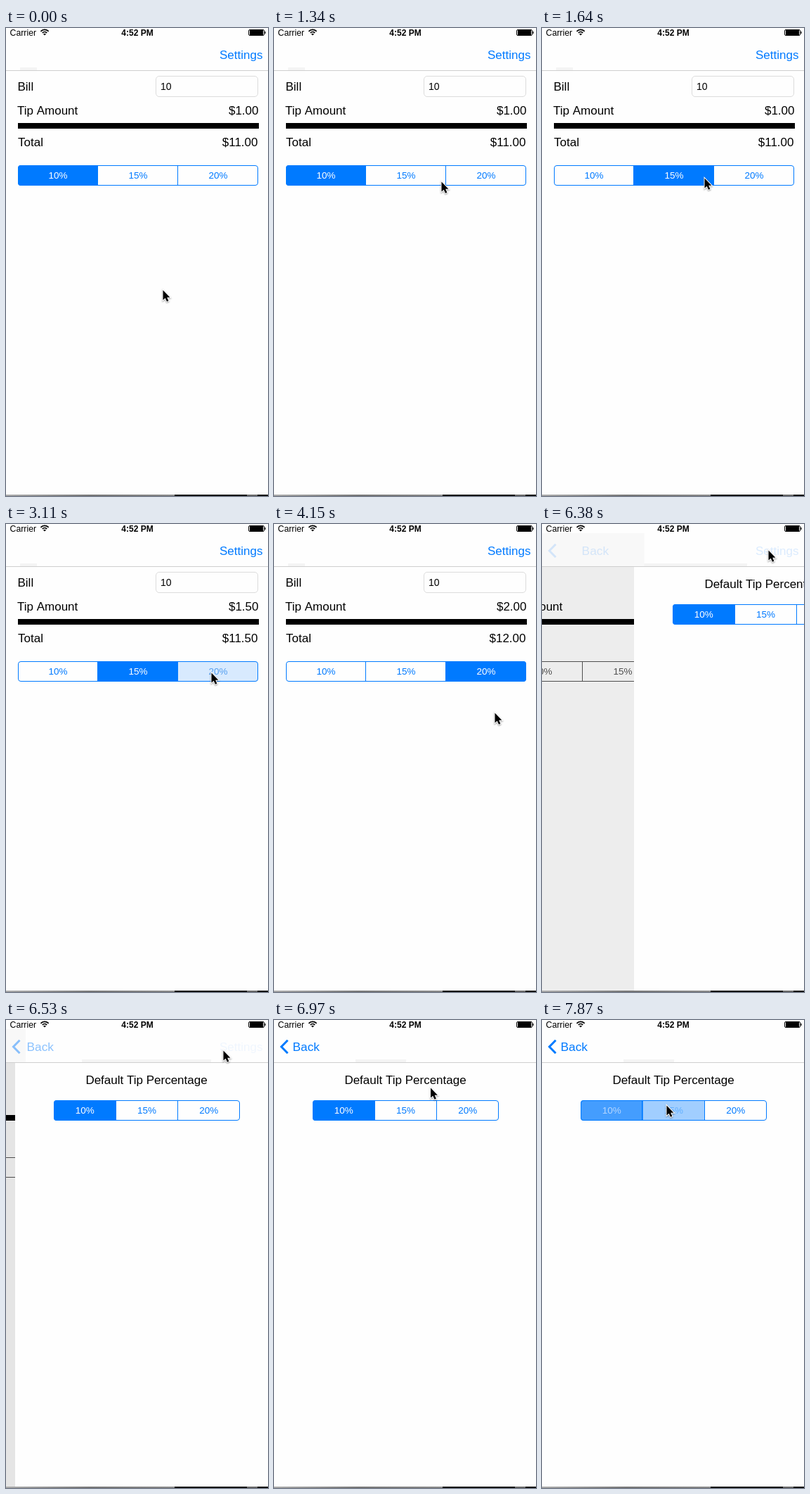
An HTML page with a canvas for the animation above (8 s loop, 373 by 665 pixels).

```html
<!DOCTYPE html>
<html lang="en">
<head>
<meta charset="utf-8">
<title>Tip calculator</title>
<style>
html, body { margin: 0; width: 100%; height: 100%; overflow: hidden; background: #fefefe; }
canvas { display: block; width: 373px; height: 665px; }
</style>
</head>
<body>
<canvas id="stage"></canvas>
<script>
const W = 373, H = 665, LOOP = 8000, STEP = 148.2;
const BLUE = '#007aff', PAPER = '#fefefe', FONT = '"Liberation Sans", Arial, sans-serif';
const canvas = document.getElementById('stage');
const ratio = window.devicePixelRatio || 1;
canvas.width = W * ratio;
canvas.height = H * ratio;
const ctx = canvas.getContext('2d');
ctx.scale(ratio, ratio);

// Pointer path: [step, x, y]
const PATH = [
  [0, 223, 372], [1, 225, 350], [3, 236, 262], [5, 238, 218],
  [9, 238, 218], [10, 231, 213], [12, 231, 213], [14, 252, 286], [16, 265, 268],
  [18, 280, 232], [20, 292, 211], [22, 292, 211], [24, 314, 268],
  [28, 314, 268], [30, 299, 215], [32, 294, 125], [34, 322, 45], [35, 328, 33],
  [42, 328, 33], [43, 322, 37], [44, 309, 43], [46, 255, 78], [48, 190, 114],
  [49, 176, 121], [50, 177, 121]
];

function pointerAt(step) {
  const i = PATH.findIndex(p => p[0] > step);
  if (i < 0) return PATH[PATH.length - 1].slice(1);
  const [a, ax, ay] = PATH[i - 1], [b, bx, by] = PATH[i];
  const u = (step - a) / (b - a);
  return [ax + (bx - ax) * u, ay + (by - ay) * u];
}

function rect(x, y, w, h, color) {
  ctx.fillStyle = color;
  ctx.fillRect(x, y, w, h);
}

function text(str, x, y, size = 17, color = '#000', align = 'left', weight = '') {
  ctx.font = `${weight} ${size}px ${FONT}`;
  ctx.textAlign = align;
  ctx.fillStyle = color;
  ctx.fillText(str, x, y);
}

function roundPath(x, y, w, h, r) {
  ctx.beginPath();
  ctx.roundRect(x, y, w, h, r);
}

function faded(alpha, draw) {
  ctx.save();
  ctx.globalAlpha = alpha;
  draw();
  ctx.restore();
}

function segments(x, y, w, fills, inks, tint = BLUE) {
  const h = 29, part = w / 3;
  ctx.save();
  roundPath(x, y, w, h, 4);
  ctx.clip();
  fills.forEach((alpha, i) => faded(alpha, () => rect(Math.round(x + part * i), y, Math.ceil(part), h, tint)));
  ctx.restore();
  roundPath(x + 0.5, y + 0.5, w - 1, h - 1, 3.5);
  ctx.strokeStyle = tint;
  ctx.lineWidth = 1;
  ctx.stroke();
  [1, 2].forEach(i => rect(Math.floor(x + part * i - 0.5), y, 1, h, tint));
  ['10%', '15%', '20%'].forEach((label, i) => {
    const ink = inks[i] || (fills[i] === 1 ? '#fff' : tint);
    text(label, x + part * (i + 0.5), y + 19, 13.5, ink, 'center');
  });
}

function statusBar() {
  text('Carrier', 5.5, 11, 12.3);
  text('4:52 PM', 187, 11, 12, '#000', 'center', 'bold');
  ctx.strokeStyle = '#000';
  ctx.lineWidth = 1.7;
  [4.4, 7.6].forEach(r => {
    ctx.beginPath();
    ctx.arc(55, 10, r, -Math.PI * 0.76, -Math.PI * 0.24);
    ctx.stroke();
  });
  ctx.beginPath();
  ctx.moveTo(55, 10.5);
  ctx.arc(55, 10.5, 2.7, -Math.PI * 0.76, -Math.PI * 0.24);
  ctx.fillStyle = '#000';
  ctx.fill();
  roundPath(345.5, 2.5, 22, 8, 1.5);
  ctx.lineWidth = 1;
  ctx.stroke();
  rect(347, 3, 19, 7, '#000');
  rect(368.5, 5, 1.2, 3, '#000');
}

function tipFills(step) {
  if (step < 10) return [1, 0, 0];
  if (step < 11) return [1, 0.15, 0];
  if (step < 21) return [0, 1, 0];
  if (step < 22) return [0, 1, 0.15];
  return [0, 0, 1];
}

function tipView(step, tint) {
  const rate = step < 16 ? 10 : step < 28 ? 15 : 20;
  const tip = 10 * rate / 100;
  text('Bill', 16.5, 89);
  roundPath(213.5, 68.5, 145, 29, 4.5);
  ctx.strokeStyle = '#dcdcdc';
  ctx.lineWidth = 1;
  ctx.stroke();
  text('10', 220, 88, 14);
  text('Tip Amount', 16, 123);
  text('$' + tip.toFixed(2), 359.5, 123, 17, '#000', 'right');
  rect(17, 135, 343, 8, '#000');
  text('Total', 17, 168);
  text('$' + (10 + tip).toFixed(2), 358.5, 168, 17, '#000', 'right');
  segments(17, 195, 342, tipFills(step), step === 21 ? [, , '#559ff0'] : [], tint);
}

function settingsView(step) {
  const blend = step >= 53;
  text('Default Tip Percentage', 187, 91, 17, '#000', 'center');
  segments(55, 114, 265, blend ? [0.73, 0.37, 0] : [1, 0, 0], blend ? ['#b4d6ff', '#62b0ff'] : []);
}

function navBar(step, rest) {
  if (step < 43) rect(20, 56, 24, 4, '#f4f4f4');
  else if (step < 46) rect(108, 56, 184, 4, '#f4f4f4');
  else rect(116, 56, 72, 4, '#f4f4f4');
  if (step > 42 && rest > 0) rect(0, 13, rest * W + 15, 47, '#f8f8f8');
  rect(0, 60, W, 1, '#cfcfcf');

  const settings = step < 42 ? 1 : [0.2, 0.14, 0.06, 0.02][step - 42] || 0;
  faded(settings, () => text('Settings', 304, 44, 17, BLUE));
  const back = step < 43 ? 0 : [0.15, 0.45, 0.75, 0.93][step - 43] || 1;
  faded(back, () => {
    ctx.beginPath();
    ctx.moveTo(19.5, 28.8);
    ctx.lineTo(10.5, 38);
    ctx.lineTo(19.5, 47.2);
    ctx.strokeStyle = BLUE;
    ctx.lineWidth = 3;
    ctx.stroke();
    text('Back', 26.5 + rest * 86, 44, 17.3, BLUE);
  });
}

function bottomEdge() {
  const shade = ctx.createLinearGradient(0, 0, 240, 0);
  shade.addColorStop(0, '#aaa');
  shade.addColorStop(0.5, '#777');
  shade.addColorStop(1, '#888');
  rect(0, 663, 240, 2, shade);
  rect(240, 663, 133, 2, '#111');
  rect(343, 663, 15, 2, '#666');
}

function pointer(x, y) {
  ctx.save();
  ctx.translate(x + 0.5, y + 0.5);
  ctx.beginPath();
  [[0, 0], [0, 14], [3.2, 11.2], [5.5, 16.2], [7.9, 15.2], [5.7, 10.3], [9.9, 10.3]]
    .forEach(p => ctx.lineTo(...p));
  ctx.closePath();
  ctx.lineWidth = 2;
  ctx.strokeStyle = '#fff';
  ctx.shadowColor = 'rgba(0,0,0,.4)';
  ctx.shadowBlur = 2 * ratio;
  ctx.shadowOffsetY = ratio;
  ctx.stroke();
  ctx.shadowColor = 'transparent';
  ctx.fillStyle = '#000';
  ctx.fill();
  ctx.restore();
}

function draw(step) {
  // Share of the push transition still to go
  const rest = step < 43 ? 1 : [0.35, 0.035, 0.008][step - 43] || 0;
  const edge = Math.round(rest * W);
  rect(0, 0, W, H, PAPER);
  if (rest > 0) {
    ctx.save();
    ctx.translate(Math.round(-112 * (1 - rest)), 0);
    tipView(step, step < 43 ? BLUE : '#555');
    ctx.restore();
    if (rest < 1) rect(0, 0, W, H, `rgba(0,0,0,${0.1 * (1 - rest)})`);
  }
  if (rest < 1) {
    rect(edge, 60, W, H, PAPER);
    ctx.save();
    ctx.translate(edge, 0);
    settingsView(step);
    ctx.restore();
  }
  rect(0, 0, W, 60, PAPER);
  navBar(step, rest);
  statusBar();
  bottomEdge();
  pointer(...pointerAt(step));
}

function tick() {
  draw(Math.floor((performance.now() % LOOP + 8) / STEP));
  requestAnimationFrame(tick);
}
tick();
</script>
</body>
</html>
```
